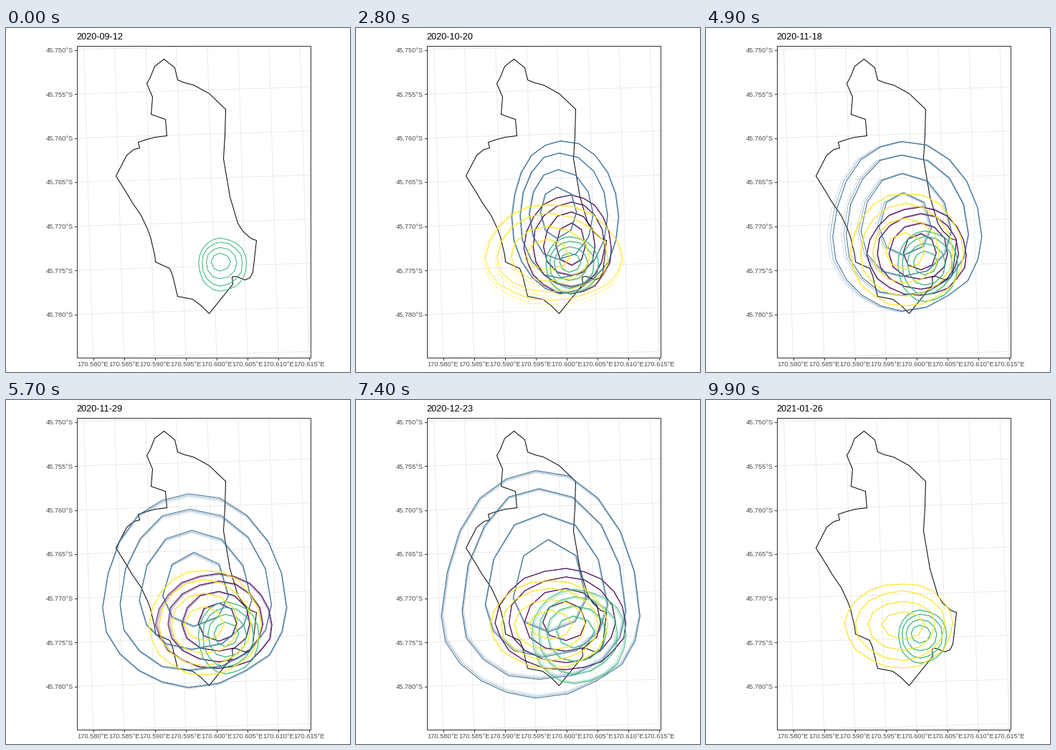
A matplotlib script for the animation above (10 s loop, 480 px wide and 480 px high).

```python
import numpy as np
import matplotlib.pyplot as plt
from matplotlib.animation import FuncAnimation
from matplotlib.collections import LineCollection
from matplotlib.colors import to_rgb

SIZE, FRAMES, STEP = 480, 100, 100
LEFT, RIGHT, TOP, BOTTOM = 98, 424, 24, 459
TILT = 0.03                  # grid convergence of the map projection
LEVELS = 4
WAKE = ((2, 0.2), (1, 0.5), (0, 1.0))    # frames of delay, opacity
FONT = "Liberation Sans"
START, DAYS = np.datetime64("2020-09-12"), 136

COAST = (220,43, 235,55, 239,72, 249,76, 261,79, 283,91, 306,113, 305,150, 303,182,
         312,235, 323,272, 330,283, 341,293, 349,296, 344,340, 340,348, 333,351,
         320,346, 315,347, 316,357, 308,367, 283,398, 272,387, 260,378, 239,374,
         232,345, 228,335, 208,326, 207,316, 201,291, 197,280, 188,261, 175,242,
         168,230, 153,206, 168,177, 178,169, 186,167, 184,159, 196,155, 207,152,
         224,150, 222,127, 202,120, 204,96, 196,77, 201,68, 207,53, 220,43)


class Range:
    """Nested contours: an outer box moves, the rest follows by rule.

    path: rows of time, left, right, top, bottom of the outer contour.
    core: inner box as fractions of the outer one, at the first and last time.
    hub: top column and widest row as fractions, at the first and last time.
    """

    def __init__(self, color, seed, core, hub, path):
        self.rgb = to_rgb(color)
        self.core, self.hub = np.array(core), np.array(hub)
        self.times, *self.sides = np.array(path, float).T
        rng = np.random.default_rng(seed)
        self.rough = [1 + rng.uniform(-0.025, 0.015, 20 - 4 * k)
                      for k in range(LEVELS)]

    def rings(self, ms):
        t0, t1 = self.times[[0, -1]]
        if not t0 <= ms <= t1:
            return []
        p = (ms - t0) / (t1 - t0)
        core = self.core[0] + p * (self.core[-1] - self.core[0])
        u, v = self.hub[0] + p * (self.hub[-1] - self.hub[0])
        l, r, t, b = outer = [np.interp(ms, self.times, s) for s in self.sides]
        inner = np.array([l, l, t, t]) + core * [r - l, r - l, b - t, b - t]
        out = []
        for k, rough in enumerate(self.rough):
            box = outer + (inner - outer) * (k / (LEVELS - 1)) ** 1.2
            out.append(egg(box, u, v, rough))
        return out


def egg(box, u, v, rough):
    """Faceted oval filling a box, with its hub at fractions u, v."""
    l, r, t, b = box
    cx, cy = l + u * (r - l), t + v * (b - t)
    a = np.arange(len(rough)) * 2 * np.pi / len(rough)
    c, s = np.cos(a) * rough, np.sin(a) * rough
    x = cx + c * np.where(c > 0, r - cx, cx - l)
    y = cy + s * np.where(s > 0, b - cy, cy - t)
    return np.column_stack([np.r_[x, x[0]], np.r_[y, y[0]]])


ranges = [
    Range("#440154", 1, [(.36, .71, .26, .71), (.36, .69, .34, .71)], [(.54, .54)], [
        (400, 236, 354, 232, 354), (1300, 236, 354, 232, 354),
        (2800, 234, 356, 232, 371), (4900, 224, 363, 249, 373),
        (6400, 195, 378, 234, 376), (9300, 192, 373, 234, 377)]),
    Range("#31688E", 2, [(.22, .54, .30, .60), (.40, .78, .30, .74)],
          [(.44, .42), (.48, .70)], [
        (300, 149, 386, 150, 385), (1100, 203, 377, 160, 375),
        (1300, 206, 375, 161, 374), (2800, 217, 367, 157, 370),
        (3900, 138, 386, 158, 402), (4900, 176, 386, 158, 394),
        (5500, 134, 394, 135, 402), (6400, 134, 389, 115, 393),
        (7400, 118, 398, 98, 415), (9300, 113, 409, 94, 424)]),
    Range("#35B779", 3, [(.26, .66, .28, .62)], [(.45, .47)], [
        (0, 268, 336, 293, 367), (1300, 269, 334, 297, 356),
        (2800, 264, 339, 291, 371), (4900, 267, 352, 283, 382),
        (6400, 268, 355, 280, 382), (7400, 244, 378, 264, 396),
        (9400, 268, 336, 293, 367), (9900, 268, 336, 293, 367)]),
    Range("#FDE725", 4, [(.29, .60, .36, .68), (.34, .74, .33, .66)],
          [(.46, .58), (.54, .46)], [
        (1500, 131, 372, 250, 438), (2300, 148, 377, 250, 439),
        (2600, 176, 372, 244, 392), (2800, 181, 370, 246, 380),
        (4900, 202, 358, 230, 388), (6400, 197, 352, 244, 380),
        (7400, 187, 350, 252, 374), (9900, 194, 343, 256, 374)]),
]

fig = plt.figure(figsize=(SIZE / 72, SIZE / 72), dpi=72, facecolor="white")
ax = fig.add_axes([0, 0, 1, 1])
ax.set(xlim=(-0.5, SIZE - 0.5), ylim=(SIZE - 0.5, -0.5))
ax.axis("off")

panel = plt.Rectangle((LEFT, TOP), RIGHT - LEFT, BOTTOM - TOP, fill=False,
                      ec="#333333", lw=1, zorder=5)
ax.add_patch(panel)


def label(x, y, text, ha):
    ax.text(x, y, text, family=FONT, size=9.3, color="#4D4D4D", ha=ha, va="center")


def line(xs, ys, color, **kw):
    return ax.plot(xs, ys, color=color, lw=1, **kw)[0]


def gridline(xs, ys):
    line(xs, ys, "#EBEBEB", zorder=1).set_clip_path(panel)


for i in range(8):
    y = 30 + 61.5 * i
    gridline((LEFT, RIGHT), (y, y - TILT * (RIGHT - LEFT)))
    if y < BOTTOM:
        line((LEFT - 3, LEFT), (y, y), "#333333")
        label(93, y + 1, f"{45.75 + 0.005 * i:.3f}°S", "right")
    x = 121 + 43.1 * i
    gridline((x, x - TILT * (BOTTOM - TOP)), (BOTTOM, TOP))
    line((x, x), (BOTTOM, BOTTOM + 3), "#333333")
    label(x, 469, f"{170.58 + 0.005 * i:.3f}°E", "center")

line(COAST[::2], COAST[1::2], "black", zorder=3)
title = ax.text(98, 16, "", family=FONT, size=12.6, color="black", va="baseline")
contours = ax.add_collection(LineCollection([], linewidths=1, zorder=4),
                             autolim=False)


def draw(frame):
    paths, colors = [], []
    for area in ranges:
        for lag, alpha in WAKE:
            rings = area.rings((frame - lag) * STEP)
            paths += rings
            colors += [(*area.rgb, alpha)] * len(rings)
    contours.set_segments(paths)
    contours.set_color(colors)
    day = int(round(DAYS * frame / (FRAMES - 1)))
    title.set_text(str(START + np.timedelta64(day, "D")))
    return contours, title


anim = FuncAnimation(fig, draw, frames=FRAMES, interval=STEP, repeat=True,
                     repeat_delay=0, init_func=lambda: draw(0))
plt.show()
```
